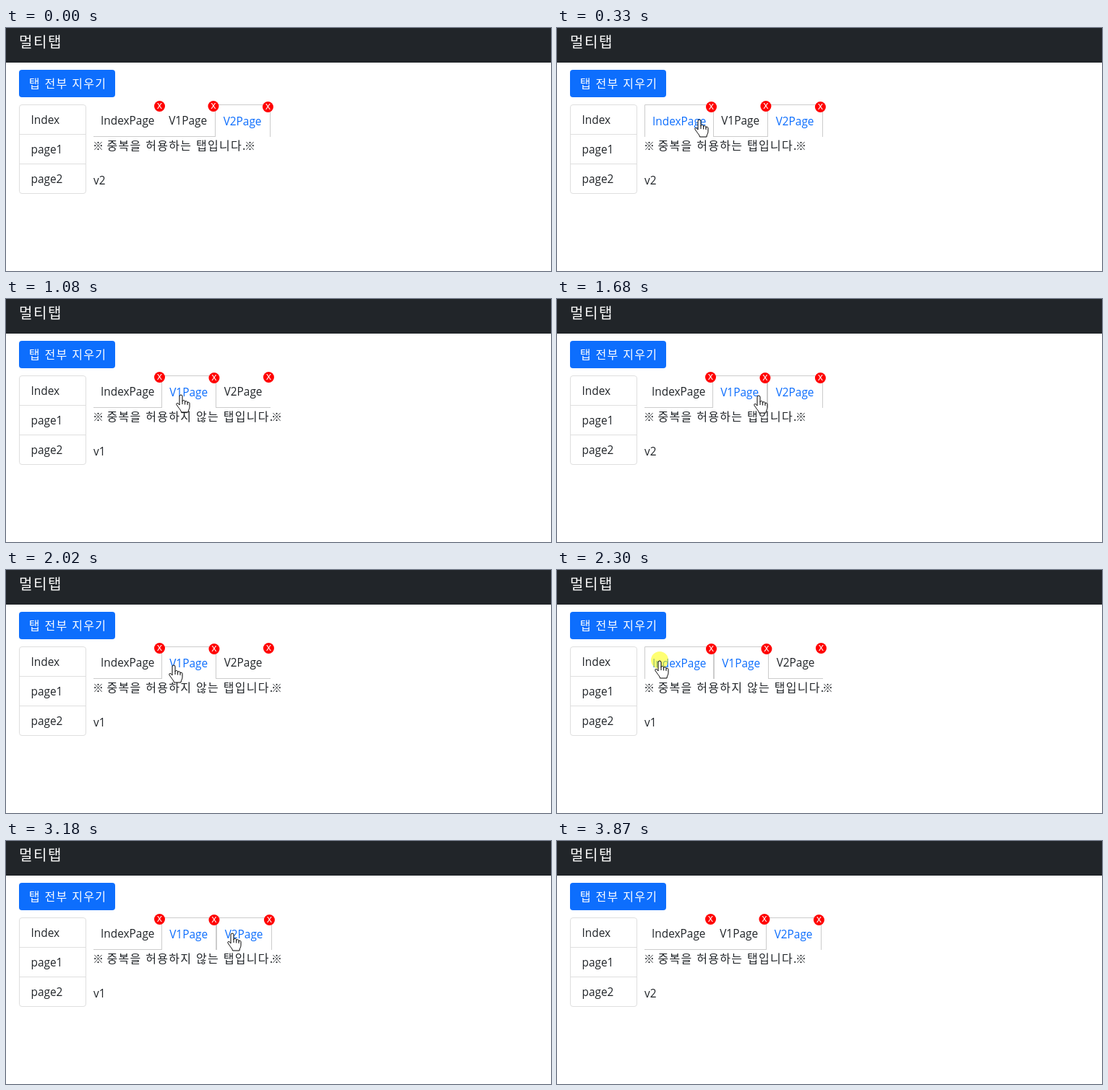
An HTML page that plays this animation: 754 by 337 pixels, repeating every 4.21 s.

```html
<!DOCTYPE html>
<html lang="ko">
<head>
<meta charset="utf-8">
<title>멀티탭</title>
<style>
html, body { margin: 0; width: 100%; height: 100%; overflow: hidden; background: #fff; }
svg { display: block; width: 754px; height: 337px; }
text { font: 15.4px "Open Sans", "Noto Sans CJK KR", "Noto Sans CJK", sans-serif; fill: #212529; }
.ko { font: 16px "Noto Sans CJK KR", "Noto Sans CJK", sans-serif; letter-spacing: 1.28px; }
.mark { font: 15px "Noto Sans CJK KR", "Noto Sans CJK", sans-serif; text-anchor: middle; }
.title { font-size: 20px; letter-spacing: 1.6px; }
.white { fill: #fff; }
.x { font-size: 14px; text-anchor: middle; fill: #fff; }
.line { fill: none; stroke: #ccc; }
.frame { fill: none; stroke: #dfdfdf; }
.hand, .arrow { fill: #fff; stroke: #000; stroke-linejoin: round; }
</style>
</head>
<body>
<svg id="stage" viewBox="0 0 754 337">
  <rect width="754" height="48" fill="#212529"/>
  <text class="ko title white" x="18" y="27">멀티탭</text>

  <rect x="18" y="58" width="133" height="38" rx="4" fill="#0d6efd"/>
  <text class="ko white" x="31.7" y="83">탭 전부 지우기</text>

  <rect class="frame" x="18.5" y="106.5" width="92" height="123" rx="3.5"/>
  <path class="frame" d="M19 147.5H110M19 188.5H110"/>
  <text x="34.5" y="133">Index</text>
  <text x="34.5" y="174">page1</text>
  <text x="34.5" y="215">page2</text>

  <g id="tabs"></g>

  <g class="page">
    <text class="mark" x="127.5" y="169">※</text>
    <text class="ko" x="139.5" y="169">중복을 허용하지 않는 탭입니다.</text>
    <text class="mark" x="374.5" y="169">※</text>
    <text class="ko" x="121" y="217">index 페이지입니다. 탭을 눌러 보세요.</text>
    <text class="ko" x="121" y="241">버튼을 누르면 탭이 추가됩니다.</text>
    <rect x="121.5" y="248.5" width="47" height="28" rx="2.5" fill="#efefef" stroke="#767676"/>
    <text class="ko" x="129" y="268">추가</text>
  </g>
  <g class="page">
    <text class="mark" x="127.5" y="169">※</text>
    <text class="ko" x="139.5" y="169">중복을 허용하지 않는 탭입니다.</text>
    <text class="mark" x="374.5" y="169">※</text>
    <text x="121" y="217">v1</text>
  </g>
  <g class="page">
    <text class="mark" x="127.5" y="169">※</text>
    <text class="ko" x="139.5" y="169">중복을 허용하는 탭입니다.</text>
    <text class="mark" x="337.5" y="169">※</text>
    <text x="121" y="217">v2</text>
  </g>

  <g id="cursor">
    <circle id="glow" cy="-1" r="12" fill="#ff0" opacity=".55"/>
    <g id="hand">
      <path class="hand" d="M-2 14V2a2 2 0 0 1 4 0v7c0-2 3.6-2 3.6 0v1c0-1.8 3.4-1.8 3.4.2v1c0-1.6 3-1.4 3 .5v5c0 3-2 4-2 7.3h-9.5c0-2-2.5-4.5-4.5-7.5c-1.5-2.3-3-3.6-1.8-4.7s2.8.6 3.8 2.2z"/>
      <path d="M2 9v4M5.6 10v3.5M9 11v3" stroke="#000" fill="none"/>
    </g>
    <path id="arrow" class="arrow" d="M.5.5V16.5L4 13l2.5 5.5 2.5-1-2.4-5.3H11.5z"/>
  </g>
</svg>
<script>
const LOOP = 4210;
const TABS = [['IndexPage', 94.2], ['V1Page', 74.45], ['V2Page', 74.45]];
const EDGES = [121, 216, 291, 367];
const START = [750, 364];

// first step, last step, number of steps, target x, y
const MOVES = [
  [70, 330, 5, 197, 127],
  [400, 470, 2, 165, 128],
  [670, 810, 3, 242, 133],
  [1140, 1210, 2, 314, 133],
  [1610, 1750, 3, 262, 134],
  [2020, 2230, 4, 142, 126],
  [2500, 2640, 3, 250, 130],
  [2970, 3250, 5, 329, 127.5],
  [3520, 3800, 5, 693, 325]
];

// press, release, tab
const CLICKS = [
  [600, 670, 0], [1010, 1080, 1], [1470, 1540, 2], [1880, 1950, 1],
  [2300, 2430, 0], [2830, 2900, 1], [3380, 3450, 2]
];

const $ = id => document.getElementById(id);
const show = (el, on) => el.setAttribute('display', on ? 'inline' : 'none');
const pages = document.querySelectorAll('.page');

function add(parent, name, attrs, label = '') {
  const el = document.createElementNS('http://www.w3.org/2000/svg', name);
  for (const key in attrs) el.setAttribute(key, attrs[key]);
  el.textContent = label;
  parent.append(el);
  return el;
}

function drawTabs(boxed) {
  const root = $('tabs');
  root.replaceChildren();
  let left = EDGES[0];
  TABS.forEach(([label, width], i) => {
    const b = boxed[i] ? 1 : 0;
    const right = left + width + 2 * b;
    const l = Math.floor(left), r = Math.floor(right);
    const d = b ? `M${l + .5} 151V106.5H${r - .5}V151` : `M${l} 150.5H${r}`;
    add(root, 'path', { class: 'line', d });
    const name = add(root, 'text', { x: left + 10 + b, y: 134 + b }, label);
    if (b) name.style.fill = '#0d6efd';
    left = right;
  });
  left = EDGES[0];
  TABS.forEach(([, width], i) => {
    const b = boxed[i] ? 1 : 0;
    const x = left + width + b - 2.7;
    add(root, 'circle', { cx: x, cy: 108.5 + b, r: 7.5, fill: '#f00' });
    add(root, 'text', { class: 'x', x, y: 112 + b }, 'x');
    left += width + 2 * b;
  });
}

function cursorAt(t) {
  let [x, y] = START;
  for (const [from, to, n, tx, ty] of MOVES) {
    if (t < from) break;
    const k = Math.min(n, 1 + Math.floor((n - 1) * (t - from) / (to - from)));
    x += (tx - x) * k / n;
    y += (ty - y) * k / n;
  }
  return [x, y];
}

let lastState = '';

function draw(t) {
  const [x, y] = cursorAt(t);
  const visible = t >= 70 && t < 3870;
  const over = visible && y >= 106 && y < 151
    ? TABS.findIndex((_, i) => x >= EDGES[i] && x < EDGES[i + 1]) : -1;
  let active = 2, pressed = false;
  for (const [down, up, tab] of CLICKS) {
    if (t >= up) active = tab;
    else if (t >= down) pressed = true;
  }

  const state = active + ',' + over;
  if (state !== lastState) {
    drawTabs(TABS.map((_, i) => i === active || i === over));
    pages.forEach((page, i) => show(page, i === active));
    lastState = state;
  }
  show($('cursor'), visible);
  show($('glow'), pressed);
  show($('hand'), over >= 0);
  show($('arrow'), over < 0);
  $('cursor').setAttribute('transform', `translate(${Math.round(x)} ${Math.round(y)})`);
}

const begin = performance.now();
function tick() {
  draw((performance.now() - begin) % LOOP);
  requestAnimationFrame(tick);
}
tick();
</script>
</body>
</html>
```
